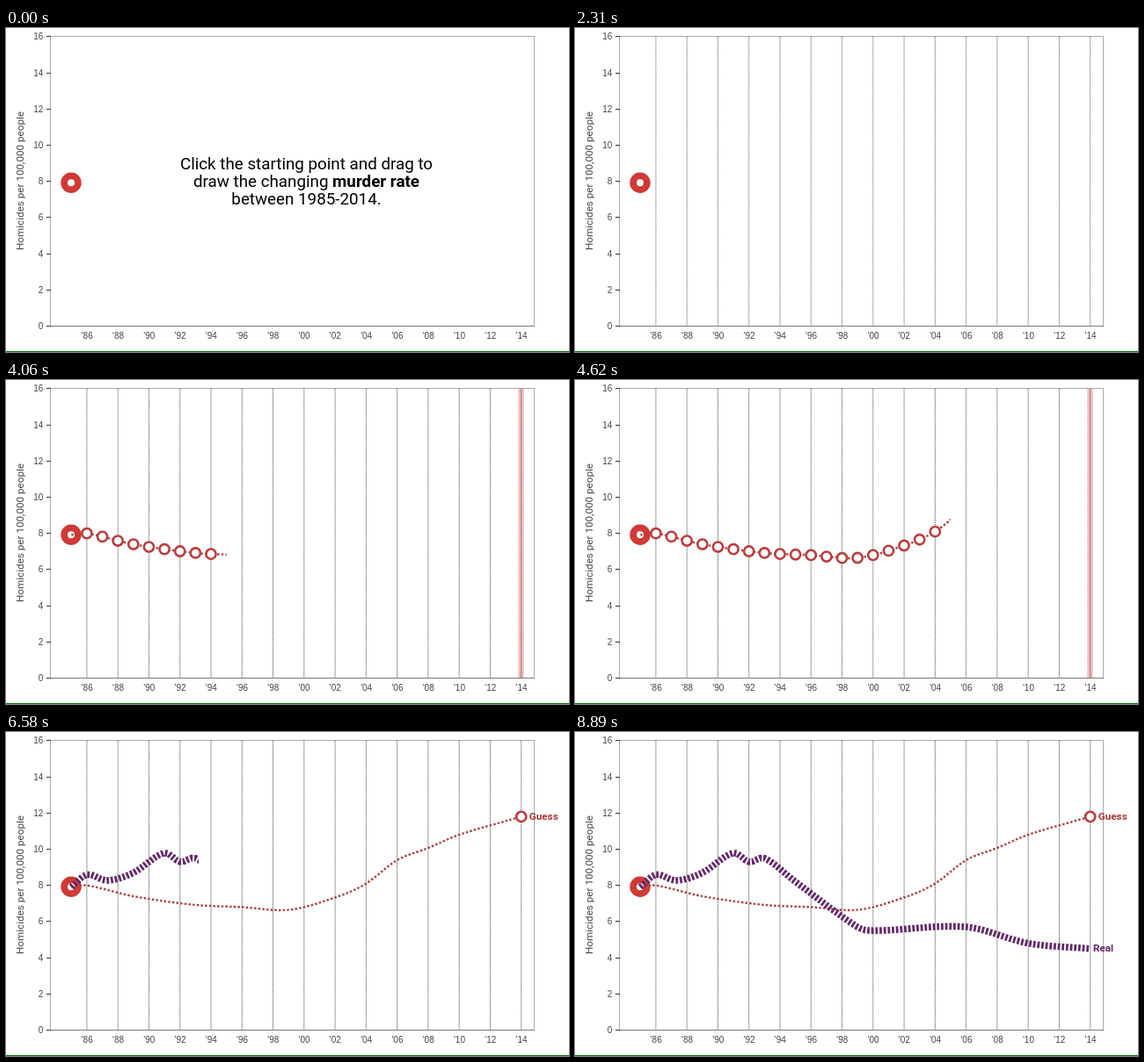
An HTML page that plays this animation: 640 by 369 pixels, repeating every 8.96 s.

```html
<!DOCTYPE html>
<html lang="en">
<head>
<meta charset="utf-8">
<title>Draw the murder rate</title>
<style>
  html, body { margin: 0; width: 100%; height: 100%; overflow: hidden; background: #fff; }
  svg { display: block; width: 640px; height: 369px; font: 10px Roboto, sans-serif; }
  .axis { fill: #444; font-family: "Liberation Sans", Arial, sans-serif; }
  .mid { text-anchor: middle; }
  .name { font-size: 11.7px; font-weight: 700; }
</style>
</head>
<body>
<svg id="stage" viewBox="0 0 640 369">
  <defs>
    <clipPath id="guessClip"><rect id="guessMask" height="369"/></clipPath>
    <clipPath id="realClip"><rect id="realMask" height="369"/></clipPath>
  </defs>
  <rect y="368" width="640" height="1" fill="#0b6b12"/>
  <rect id="target" x="582.3" y="10" width="6.4" height="329" fill="#f3bcbc"/>
  <g id="grid" stroke="#444" stroke-dasharray="1 .9"></g>
  <rect x="50.5" y="9.5" width="550" height="330" fill="none" stroke="#aaa"/>
  <path d="M50 339.5H601" stroke="#777"/>
  <g id="axis" class="axis"></g>
  <text class="mid" transform="translate(19.5 174) rotate(-90)" font-size="11.7" fill="#444">Homicides per 100,000 people</text>
  <g id="prompt" class="mid" font-size="18.8">
    <text x="341.5" y="160.5">Click the starting point and drag to</text>
    <text x="341.5" y="181">draw the changing <tspan font-weight="700">murder rate</tspan></text>
    <text x="341.5" y="201.3">between 1985-2014.</text>
  </g>
  <circle id="start" cx="74" cy="176.3" r="11.7" fill="#d03936"/>
  <circle cx="74" cy="176.3" r="4" fill="#fff"/>
  <path id="guess" clip-path="url(#guessClip)" fill="none" stroke="#ab4343" stroke-width="2.4" stroke-dasharray="2.5 2.17"/>
  <g id="dots" fill="#fff" stroke="#bb3d3d" stroke-width="2.6"></g>
  <path id="real" clip-path="url(#realClip)" fill="none" stroke="#642c69" stroke-width="7.6" stroke-dasharray="2.8 1.87"/>
  <text id="guessName" class="name" x="594.8" y="100.3" fill="#ad3636">Guess</text>
  <text id="realName" class="name" x="589" y="250" fill="#5f2566">Real</text>
</svg>
<script>
const LOOP = 8960, YEARS = 29, PULSE = 1050;
const $ = id => document.getElementById(id);
const xOf = i => 74.3 + 17.635 * i;
const yOf = v => 339.5 - 20.6 * v;
const ramp = (t, from, to) => Math.max(0, Math.min(1, (t - from) / (to - from)));

function add(parent, tag, attrs, text = '') {
  const el = document.createElementNS('http://www.w3.org/2000/svg', tag);
  for (const key in attrs) el.setAttribute(key, attrs[key]);
  el.textContent = text;
  return parent.appendChild(el);
}

// Smooth rate curve through [years since 1985, rate] key points
function smooth(keys) {
  const at = i => keys[Math.max(0, Math.min(keys.length - 1, i))];
  const slope = i => (at(i + 1)[1] - at(i - 1)[1]) / (at(i + 1)[0] - at(i - 1)[0]);
  return year => {
    const i = Math.max(1, keys.findIndex(key => key[0] >= year));
    const [a, v0] = keys[i - 1], [b, v1] = keys[i];
    const h = b - a, u = (year - a) / h, w = 1 - u;
    return w * w * (1 + 2 * u) * v0 + u * u * (1 + 2 * w) * v1
      + h * u * w * (w * slope(i - 1) - u * slope(i));
  };
}

function pathOf(rate) {
  const points = [];
  for (let i = 0; i <= YEARS; i += .25) points.push(`${xOf(i)} ${yOf(rate(i))}`);
  return 'M' + points.join('L');
}

const guess = smooth([[0, 7.92], [1, 8], [4, 7.4], [8, 6.92], [11, 6.8], [14, 6.65],
  [17, 7.33], [19, 8.1], [21, 9.4], [23, 10.07], [25, 10.8], [29, 11.8]]);
const real = smooth([[0, 7.9], [1, 8.6], [2.3, 8.27], [4, 8.7], [6, 9.8], [7, 9.3], [8, 9.5],
  [10, 8.2], [14, 5.7], [15, 5.5], [21, 5.7], [25, 4.8], [29, 4.5]]);

for (let v = 0; v <= 16; v += 2) {
  const y = Math.round(yOf(v) - .5) + .5;
  add($('axis'), 'path', { d: `M46 ${y}h5`, stroke: '#333' });
  add($('axis'), 'text', { x: 42.3, y: y + 3.6, 'text-anchor': 'end' }, v);
}
for (let i = 1; i <= YEARS; i += 2) {
  const x = xOf(i);
  add($('grid'), 'path', { d: `M${x} 10V339` });
  add($('axis'), 'text', { x: x + .3, y: 354, class: 'mid' }, "'" + String((85 + i) % 100).padStart(2, '0'));
}
$('guess').setAttribute('d', pathOf(guess));
$('real').setAttribute('d', pathOf(real));
const dots = Array.from({ length: YEARS }, (_, i) =>
  add($('dots'), 'circle', { cx: xOf(i + 1), cy: yOf(guess(i + 1)), r: 5.6 }));

function draw(t) {
  const show = (id, opacity) => $(id).style.opacity = opacity;
  show('start', .71 + .29 * Math.cos(Math.min(t / PULSE, 2) * 2 * Math.PI));
  show('prompt', 1 - ramp(t, 1680, 2100));
  show('grid', ramp(t, 1750, 2380));
  show('target', ramp(t, 3080, 3290) - ramp(t, 5050, 5260));
  show('guessName', ramp(t, 5600, 6100));
  show('realName', ramp(t, 7140, 7350));

  // The pointer starts slowly, then speeds up
  const year = Math.min(YEARS + .5, 20.1 * (Math.max(0, t - 3080) / 1540) ** 1.53);
  $('guessMask').setAttribute('width', year < 1 ? 0 : xOf(Math.floor(year)));
  const fade = 1 - ramp(t, 5430, 6160);
  dots.forEach((dot, i) => {
    const opacity = i === YEARS - 1 ? 1 : fade;
    dot.style.opacity = year < i + 1.25 ? 0 : opacity;
  });
  $('realMask').setAttribute('width', 70 + 520 * ramp(t, 6300, 7280));
}

const began = performance.now();
function tick() {
  draw((performance.now() - began) % LOOP);
  requestAnimationFrame(tick);
}
tick();
</script>
</body>
</html>
```
